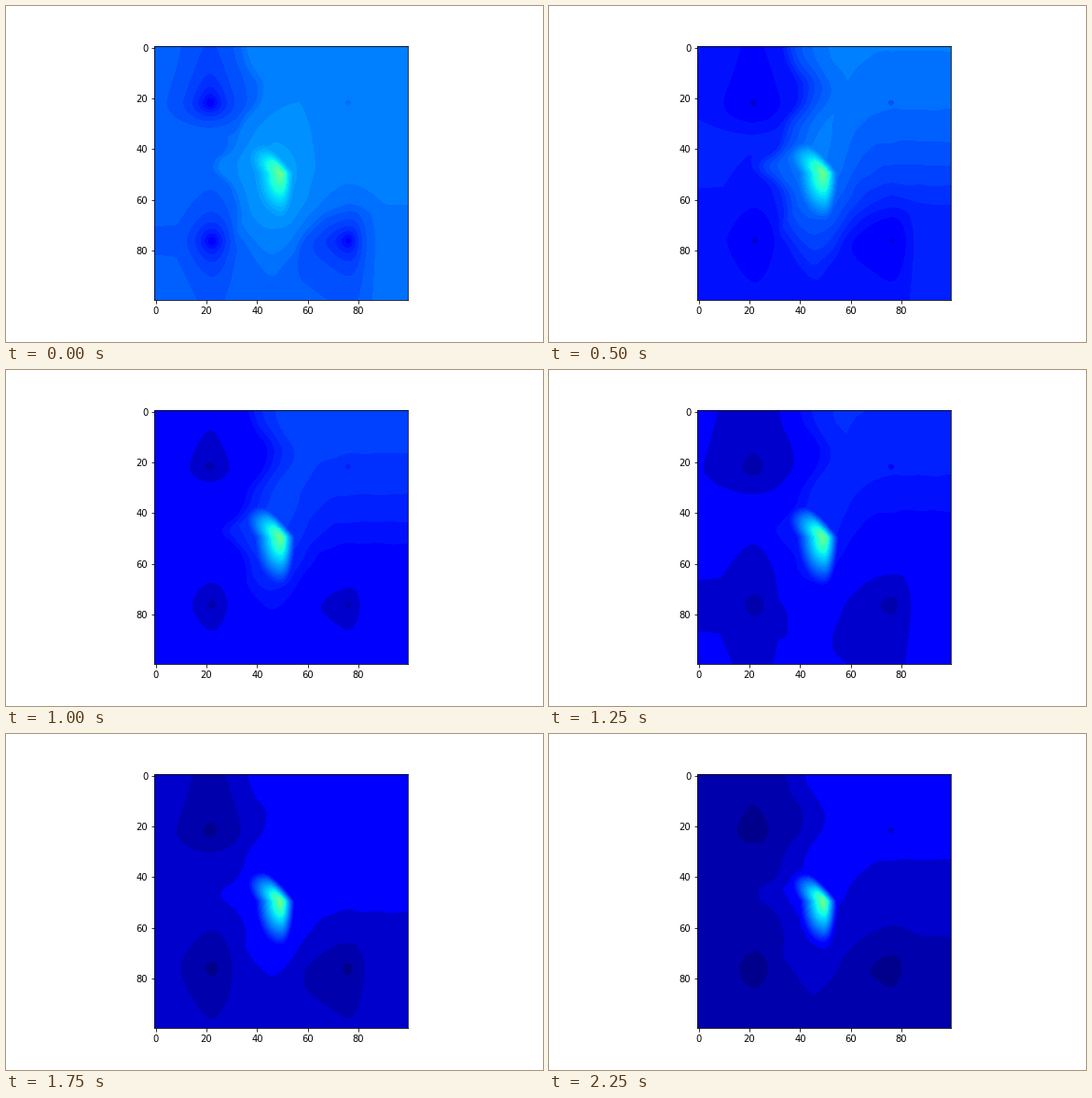
A matplotlib script that plays this animation: 576 px wide and 360 px high, repeating every 2.5 s.

```python
import numpy as np
import matplotlib.pyplot as plt
from matplotlib.animation import FuncAnimation

RES = 272
FRAMES = 10
axis = (np.arange(RES) + 0.5) * 100 / RES - 0.5
GX, GY = np.meshgrid(axis, axis)


def wobble(rng, size=0.35, waves=5):
    """Small smooth displacement that roughens the contours."""
    total = np.zeros_like(GX)
    for _ in range(waves):
        kx, ky = rng.uniform(-0.6, 0.6, 2)
        total += np.sin(kx * GX + ky * GY + rng.uniform(0, 2 * np.pi))
    return size * total / np.sqrt(waves)


rng = np.random.default_rng(4)
X, Y = GX + wobble(rng), GY + wobble(rng)


def bump(u, centre, width):
    return np.exp(-((u - centre) / width) ** 2)


def reach(d, before, after):
    """Distance along one axis, stretched (s > 0) or tightened (s < 0) per side."""
    s = np.where(d < 0, before, after)
    d = np.abs(d)
    return np.where(s > 0, d / (1 + s * d), d * (1 - s * d))


def cone(cx, cy, west, east, north, south):
    """Drawdown around a producing well."""
    r = np.hypot(reach(GX - cx, west, east), reach(GY - cy, north, south))
    return 6 * np.exp(-r / 7)


# Signed distance from the front between the drained side and the far corner.
front_x = 33 + 8.5 * bump(Y, 17, 10) - 9 * bump(Y, 47, 7)
front_y = 62 + 26 * bump(X, 46, 14)
front = np.minimum(X - front_x, 0.3 * (front_y - Y))

wells = np.maximum.reduce([
    cone(21.5, 21.8, 0.025, 0.02, 0.08, -0.02),
    cone(22.3, 76.2, 0.02, -0.01, 0.035, 0.05),
    cone(76, 76, 0.077, -0.08, 0.04, 0.05)])
rise = 6 * np.tanh(0.08 * np.maximum(front, 0))
drop = wells / (1 + np.exp(front / 1.5)) + 0.43 * np.clip(-front, 0, 1)

# Bright lobe: sharp to the east, leaning north-west, with a long southern tail.
dy = GY - 49.5
dx = GX - 49.5 - 0.7 * np.minimum(dy, 0)
lobe = np.clip(1 - np.hypot(dx / np.where(dx > 0, 5.5, 10.5),
                            dy / np.where(dy > 0, 19, 12)), 0, 1)
halo = bump(X, 48, 13.5) * bump(Y, 52, 20)
dot = np.hypot(GX - 76, GY - 21.8) < 1.1

# Colour bands: wide in the dark blues, 1/64 above them.
EDGES = np.r_[0, 0.02, 0.048, 0.078, np.arange(0.13, 0.6, 1 / 64)]
SHADES = EDGES[:-1] + 0.7 * np.diff(EDGES)


def pressure(i):
    level = 0.02 + 0.22 * np.exp(-0.22 * i)
    rise_rate = 0.005 * (1 - np.exp(-i - 0.7)) + 0.004 * i * np.exp(1 - i / 2.5)
    drop_rate = 0.009 + 0.012 * np.exp(-i / 3)
    v = level + rise_rate * rise - drop_rate * drop
    v += 0.03 * np.exp(-i / 3) * halo - 0.025 * dot
    v += (0.49 - v) * lobe ** (1 + 0.6 * np.exp(-i / 3))
    band = np.searchsorted(EDGES, v) - 1
    return SHADES[np.clip(band, 0, len(SHADES) - 1)]


plt.rcParams["font.family"] = "DejaVu Sans"
fig = plt.figure(figsize=(8, 5), dpi=72, facecolor="white")
fig.subplots_adjust(left=0.125, right=0.9, bottom=0.125, top=0.88)
ax = fig.add_subplot()
image = ax.imshow(pressure(0), cmap="jet", vmin=0, vmax=1, interpolation="nearest",
                  extent=(-0.5, 99.5, 99.5, -0.5))
ax.set_xticks(range(0, 100, 20))
ax.set_yticks(range(0, 100, 20))


def update(i):
    image.set_data(pressure(i))
    return [image]


anim = FuncAnimation(fig, update, frames=FRAMES, interval=250, repeat=True,
                     repeat_delay=0)
plt.show()
```
